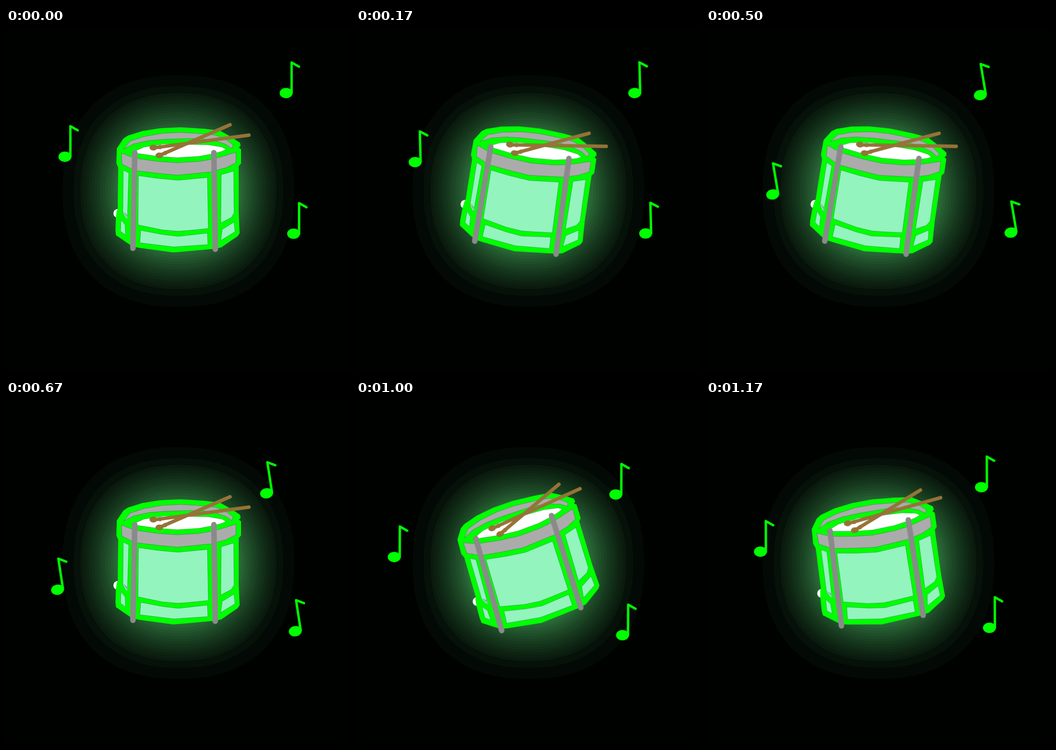
These frames come from a looping animation (748x748 px, 1340 ms). An HTML page:

```html
<!DOCTYPE html>
<html lang="en">
<head>
<meta charset="utf-8">
<title>Drum and notes</title>
<style>
  html, body { margin: 0; width: 100%; height: 100%; overflow: hidden; background: #000200; }
  svg { display: block; width: 100%; height: 100%; }
  #drum, #notes { animation: 1340ms step-end infinite; }
  #drum { transform-origin: 372px 352px; animation-name: rock; }
  #notes { animation-name: drift; }
  @keyframes rock {
    0% { transform: rotate(0deg); }
    12.687% { transform: rotate(8.5deg); }
    24.627% { transform: rotate(22.4deg); }
    37.313% { transform: rotate(8.5deg); }
    50% { transform: rotate(0deg); }
    61.94% { transform: rotate(-8deg); }
    74.627% { transform: rotate(-16.8deg); }
    87.313%, 100% { transform: rotate(-8deg); }
  }
  @keyframes drift {
    0% { transform: translate(454px, 289.3px) rotate(0deg); }
    12.687% { transform: translate(454.6px, 293px) rotate(-1.4deg); }
    24.627% { transform: translate(451.7px, 295.7px) rotate(-2.75deg); }
    37.313% { transform: translate(468px, 317.3px) rotate(-9.5deg); }
    50% { transform: translate(435.7px, 372.5px) rotate(-8.7deg); }
    61.94% { transform: translate(455px, 345px) rotate(-7.9deg); }
    74.627% { transform: translate(409px, 352.5px) rotate(.3deg); }
    87.313%, 100% { transform: translate(444.3px, 338px) rotate(-.2deg); }
  }
  .shell { fill: #0f0; stroke: #0f0; stroke-width: 2; stroke-linejoin: round; }
  .mint { fill: #93f4be; }
  .metal { fill: #ababab; }
  .edge { stroke: #176b2c; stroke-width: .8; stroke-opacity: .65; }
  .strap { stroke: #8a8a8a; stroke-width: 12; stroke-linecap: round; }
  .stick { fill: #967338; stroke: #967338; stroke-linecap: round; }
</style>
</head>
<body>
<svg viewBox="0 0 748 748" preserveAspectRatio="none">
  <defs>
    <g id="note">
      <ellipse rx="14" ry="11.2" fill="#0f0"/>
      <path d="M12 0V-66.5L28-57.5" fill="none" stroke="#0f0" stroke-width="5.2" stroke-linecap="round" stroke-linejoin="round"/>
    </g>
  </defs>

  <g id="glow"></g>

  <g id="drum">
    <circle cx="243" cy="403" r="9.5" fill="#fff"/>
    <path class="shell" d="M242 262L256 241 265 235 297 225 335 219 380 217 430 220 465 224 488 237 508 250 509 256 505 260 510 264V294L505 300V400L507 446 503 452 468 476 455 479 364 487 290 477 275 474 240 450 239 440 240 411 241 403 242 397 244 394 245 304 241 294Z"/>
    <g class="edge">
      <path class="metal" d="M256 263L270 246 300 236 340 229 380 227 430 230 456 233 476 241 494 254 491 262 478 253 450 244 420 240 380 241 345 242 310 245 278 252Z"/>
      <path fill="#fff" d="M273 271L300 259 345 252 395 253 440 254 470 259 478 264 470 268 452 273 420 279 372 282 330 279 288 273Z"/>
      <path class="metal" d="M251 272L280 283 330 290 372 293 420 290 450 285 478 277 500 270V293L478 304 445 313 372 320 330 316 280 310 252 296Z"/>
      <g class="mint">
        <path d="M255 309L267 315 266 350 264 419 254 402Z"/>
        <path d="M288 321L330 327 374 331 438 325 440 436 400 440 374 442 340 439 287 428Z"/>
        <path d="M468 319L495 311 496 402 490 412 467 424Z"/>
        <path d="M250 417L259 428 260 450 249 442Z"/>
        <path d="M293 440L340 449 375 453 438 446 439 471 365 476 291 467Z"/>
        <path d="M470 438L496 422 498 443 467 462Z"/>
      </g>
    </g>
    <path d="M253 398L266 408V416Z" fill="#72b895"/>
    <path d="M247 406L266 425" stroke="#0f0" stroke-width="11"/>
    <path class="strap" d="M280 271L276 479M452 271L455 481"/>
    <g class="stick">
      <path d="M528 233L325 260M487 210.5L334 277" fill="none" stroke-width="7.8"/>
      <ellipse cx="320.5" cy="260" rx="8" ry="6"/>
      <ellipse cx="333.5" cy="277" rx="8" ry="5.8"/>
      <circle cx="335" cy="259" r="4.2"/>
      <circle cx="346" cy="272" r="4.2"/>
    </g>
  </g>

  <g id="notes">
    <use href="#note" x="-326" y="-9.3"/>
    <use href="#note" x="155" y="-147.8"/>
    <use href="#note" x="171.3" y="158"/>
  </g>
</svg>
<script>
  const glow = document.getElementById('glow');

  // Circle that gets squarer as it grows
  function blob(r) {
    const power = 1 - r / 1800;
    const bend = v => r * Math.sign(v) * Math.abs(v) ** power;
    const pts = [];
    for (let i = 0; i < 72; i++) {
      const a = i * Math.PI / 36;
      pts.push((375 + bend(Math.cos(a))).toFixed(1) + ',' + (354.5 + bend(Math.sin(a))).toFixed(1));
    }
    return pts.join(' ');
  }

  function band(r) {
    const t = ((252 - r) / 122) ** 1.55;
    const mix = (lo, hi) => Math.round(lo + (hi - lo) * t);
    const p = document.createElementNS('http://www.w3.org/2000/svg', 'polygon');
    p.setAttribute('points', blob(r));
    p.setAttribute('fill', `rgb(${mix(3, 46)},${mix(9, 114)},${mix(4, 61)})`);
    glow.append(p);
  }

  band(252);
  band(228);
  for (let r = 213; r >= 117; r -= 6) band(r);
</script>
</body>
</html>
```
